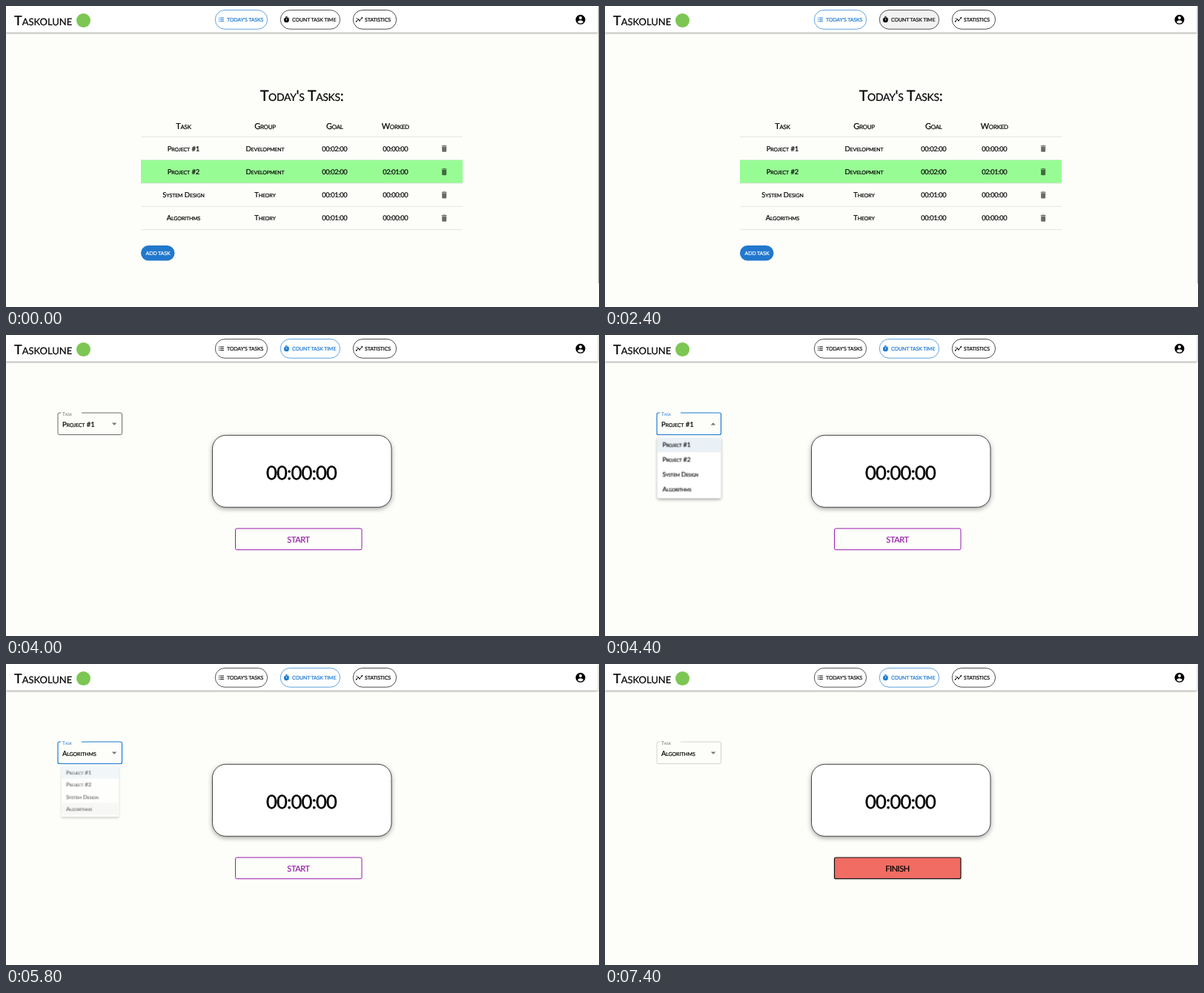
An HTML page that plays this animation: 800x406 px, repeating every 8 s.

```html
<!DOCTYPE html>
<html lang="en">
<head>
<meta charset="utf-8">
<title>Task tracker</title>
<style>
  html, body { margin: 0; width: 100%; height: 100%; overflow: hidden; background: #fdfefa; }
  svg { display: block; width: 100vw; height: 100vh; }

  text {
    font: 9.5px Lato, "Open Sans", sans-serif;
    font-variant-caps: small-caps;
    letter-spacing: -.1px;
    text-rendering: geometricPrecision;
    fill: currentColor; stroke: currentColor; stroke-width: .2px;
  }
  .mid { text-anchor: middle; }
  .brand { font-size: 18px; letter-spacing: 0; }
  .title { font-size: 20px; letter-spacing: -.35px; }
  .head { font-size: 11px; letter-spacing: -.3px; }
  .time { font-size: 9.3px; letter-spacing: -.35px; }
  .caps { font-size: 7px; letter-spacing: -.12px; }
  .option { font-size: 8.7px; }
  .label { font-size: 6.5px; stroke-width: 0; }
  .clock { font-size: 25.5px; letter-spacing: -.8px; stroke-width: .4px; }
  .action { font-size: 11px; letter-spacing: -.4px; }

  .pill { fill: #fff; stroke: currentColor; stroke-width: .7; }
  .line { fill: none; stroke: currentColor; }
  .solid { fill: currentColor; }
  .bar { filter: drop-shadow(0 1px 1.3px rgba(0, 0, 0, .4)); }
  .card { filter: drop-shadow(0 2px 3px rgba(0, 0, 0, .35)); }
  .paper { filter: drop-shadow(0 2px 2px rgba(0, 0, 0, .35)); }

  /* 1.25% of the loop is 100 ms */
  .run { animation: 8s linear infinite; }
  .hard { animation-timing-function: step-end; }

  .today { animation-name: today; }
  @keyframes today { 0% { opacity: 1 } 36.25%, 100% { opacity: 0 } }
  .timer { animation-name: timer; }
  @keyframes timer { 0% { opacity: 0 } 36.25%, 100% { opacity: 1 } }

  .tab-today { animation-name: tab-off; }
  @keyframes tab-off { 0%, 36.25% { color: #1f7cd3 } 38.5%, 100% { color: #111 } }
  .tab-count { animation-name: tab-on; }
  @keyframes tab-on { 0%, 36.25% { color: #111 } 38.5%, 100% { color: #1f7cd3 } }
  .tab-hover { animation-name: tab-hover; }
  @keyframes tab-hover {
    0%, 24% { opacity: 0 } 27.5%, 36.25% { opacity: .05 } 38.5%, 100% { opacity: 0 }
  }

  .frame { animation-name: frame; }
  @keyframes frame {
    0% { stroke: #c8c8c6; stroke-width: .8 }
    45% { stroke: #444; stroke-width: .8 }
    52.5% { stroke: #1976d2; stroke-width: 1.15 }
    86.25%, 100% { stroke: #c8c8c6; stroke-width: .8 }
  }
  .label { animation-name: label; }
  @keyframes label { 0% { color: #666 } 52.5% { color: #1976d2 } 86.25%, 100% { color: #666 } }
  .arrow { transform-origin: 146px 120px; animation-name: arrow; }
  @keyframes arrow { 0% { transform: none } 52.5% { transform: rotate(180deg) } 71.25%, 100% { transform: none } }
  .first { animation-name: first; }
  @keyframes first { 0% { opacity: 0 } 40% { opacity: 1 } 71.25%, 100% { opacity: 0 } }
  .second { animation-name: second; }
  @keyframes second { 0% { opacity: 0 } 71.25%, 100% { opacity: 1 } }

  .menu { transform-origin: 113px 137px; animation-name: menu; animation-timing-function: ease-in-out; }
  @keyframes menu {
    0%, 52.5% { opacity: 0; transform: scale(.75, .5625) }
    55.5%, 71.25% { opacity: 1; transform: none }
    74%, 100% { opacity: 0; transform: scale(.75, .5625) }
  }
  .pointer { animation-name: pointer; }
  @keyframes pointer {
    0% { opacity: 0; transform: translateY(20px) }
    58.75% { opacity: 1; transform: translateY(20px) }
    61.25% { opacity: 1; transform: translateY(40.3px) }
    63.75%, 100% { opacity: 1; transform: translateY(60.5px) }
  }

  .start { animation-name: start; }
  @keyframes start { 0% { opacity: 1 } 87.5%, 100% { opacity: 0 } }
  .start-hover { animation-name: start-hover; }
  @keyframes start-hover { 0%, 84.5% { opacity: 0 } 87%, 100% { opacity: .05 } }
  .finish { animation-name: finish; }
  @keyframes finish { 0% { opacity: 0 } 87.5%, 100% { opacity: 1 } }
  .finish-fill { animation-name: finish-fill; }
  @keyframes finish-fill { 0%, 87.4% { fill: #fdfefa } 90%, 100% { fill: #f16c62 } }
</style>
</head>
<body>
<svg viewBox="0 0 800 406" preserveAspectRatio="none" color="#000">
  <g class="run hard today">
    <text class="mid title" x="399" y="128">Today's Tasks:</text>
    <g id="table"></g>
    <rect x="182" y="323" width="45.5" height="20.5" rx="10.2" fill="#2278cd"/>
    <text class="mid caps" x="205" y="336" color="#fff">ADD TASK</text>
  </g>

  <g class="run hard timer">
    <path class="run hard frame" fill="none" d="M102 105H154.5a2 2 0 0 1 2 2V132.5a2 2 0 0 1-2 2H72a2 2 0 0 1-2-2V107a2 2 0 0 1 2-2H74"/>
    <text class="run hard label" x="76" y="109">Task</text>
    <path class="run hard arrow" d="M142.8 118.5h6.6l-3.3 3.3z" fill="#757575"/>
    <text class="run hard first" x="76" y="124">Project #1</text>
    <text class="run hard second" x="76" y="124">Algorithms</text>

    <rect class="card" x="278.5" y="135.3" width="241.5" height="97" rx="18" fill="#fff" stroke="#333" stroke-width=".9"/>
    <text class="mid clock" x="398.5" y="194.5">00:00:00</text>

    <g class="run hard start" color="#9519ab">
      <rect class="run start-hover solid" x="309.5" y="261" width="170.5" height="28.7" rx="2"/>
      <rect class="line" x="309.5" y="261" width="170.5" height="28.7" rx="2"/>
      <text class="mid action" x="394.5" y="279.6">START</text>
    </g>
    <g class="run hard finish">
      <rect class="run finish-fill" x="309.5" y="261" width="170.5" height="28.7" rx="2" stroke="#111" stroke-width="1.2"/>
      <text class="mid action" x="394.5" y="279.6">FINISH</text>
    </g>

    <g class="run menu">
      <rect class="paper" x="70" y="137" width="87" height="85" rx="2" fill="#fff"/>
      <rect x="70" y="138.5" width="87" height="20" fill="#e8f1f7"/>
      <rect class="run hard pointer" x="70" y="138.5" width="87" height="20" fill="#f3f3f3"/>
      <g id="options"></g>
    </g>
  </g>

  <rect class="bar" width="798.5" height="35.7" fill="#fff"/>
  <text class="brand" x="11" y="25.5">Taskolune</text>
  <circle cx="104.5" cy="19.5" r="9.5" fill="#7cc653"/>

  <g class="run tab-today">
    <rect class="pill" x="282.3" y="5.5" width="70.3" height="25.7" rx="12.8"/>
    <path class="line" d="M287 16h1.1m.8 0h5M287 18.3h1.1m.8 0h5M287 20.6h1.1m.8 0h5"/>
    <text class="caps" x="298" y="20.8">TODAY'S TASKS</text>
  </g>
  <g class="run tab-count">
    <rect class="pill" x="370.3" y="5.5" width="80.3" height="25.7" rx="12.8"/>
    <rect class="run tab-hover" x="370.3" y="5.5" width="80.3" height="25.7" rx="12.8"/>
    <circle class="solid" cx="378.4" cy="18.8" r="3.5"/>
    <path class="line" d="M377.2 14.3h2.4M381 15.7l.8.8"/>
    <path d="M378.4 17v2.2" stroke="#fff" stroke-width=".8"/>
    <text class="caps" x="386" y="20.8">COUNT TASK TIME</text>
  </g>
  <g>
    <rect class="pill" x="468.3" y="5.5" width="58.3" height="25.7" rx="12.8"/>
    <path class="line" d="M472.5 21l2.7-2.9 1.9 1.6 3.4-4M472.8 17.2l1.2-1.2"/>
    <g class="solid">
      <circle cx="472.7" cy="20.8" r=".9"/><circle cx="475.2" cy="18.1" r=".9"/>
      <circle cx="477.1" cy="19.7" r=".9"/><circle cx="480.3" cy="15.9" r=".9"/>
    </g>
    <text class="caps" x="484" y="20.8">STATISTICS</text>
  </g>

  <circle cx="775" cy="18.3" r="6.5"/>
  <circle cx="775" cy="16.1" r="2" fill="#fff"/>
  <path d="M771 21.4q1.5-2.1 4-2.1t4 2.1q-1.5 2-4 2t-4-2z" fill="#fff"/>
  <rect class="run hard today" x="799" width="1" height="374" fill="#b0b0b0"/>
</svg>

<script>
  const columns = [239.5, 349.5, 443.3, 525.3];
  const tasks = [
    ["Project #1", "Development", "00:02:00", "00:00:00"],
    ["Project #2", "Development", "00:02:00", "02:01:00"],
    ["System Design", "Theory", "00:01:00", "00:00:00"],
    ["Algorithms", "Theory", "00:01:00", "00:00:00"],
  ];
  const tableTop = 176.5, rowHeight = 31.3;

  const cells = (values, y, style) => values.map((value, i) =>
    `<text class="mid ${style(i)}" x="${columns[i]}" y="${y}">${value}</text>`).join("");
  const rule = y => `<path d="M182 ${y}H616" stroke="#e2e3df" stroke-width=".9"/>`;
  const bin = y => `<path transform="translate(591.2 ${y})" fill-opacity=".58"
    d="M-3.4-4.3h1.8l.5-.5h2.2l.5.5h1.8v1h-6.8zM-3-2.8h6v6.2q0 1-1 1h-4q-1 0-1-1z"/>`;

  const rows = tasks.map((task, i) => {
    const y = tableTop + i * rowHeight, middle = y + rowHeight / 2;
    const done = task[3] > task[2];
    return (done ? `<rect x="182" y="${y}" width="434" height="${rowHeight}" fill="#98fc95"/>` : "")
      + cells(task, middle + 3.4, c => c > 1 ? "time" : "")
      + bin(middle + .3) + rule(y + rowHeight);
  });

  document.getElementById("table").innerHTML =
    cells(["Task", "Group", "Goal", "Worked"], 166.3, () => "head") + rule(tableTop) + rows.join("");
  document.getElementById("options").innerHTML = tasks.map(([name], i) =>
    `<text class="option" x="77" y="${151.6 + i * 20.2}">${name}</text>`).join("");
</script>
</body>
</html>
```
